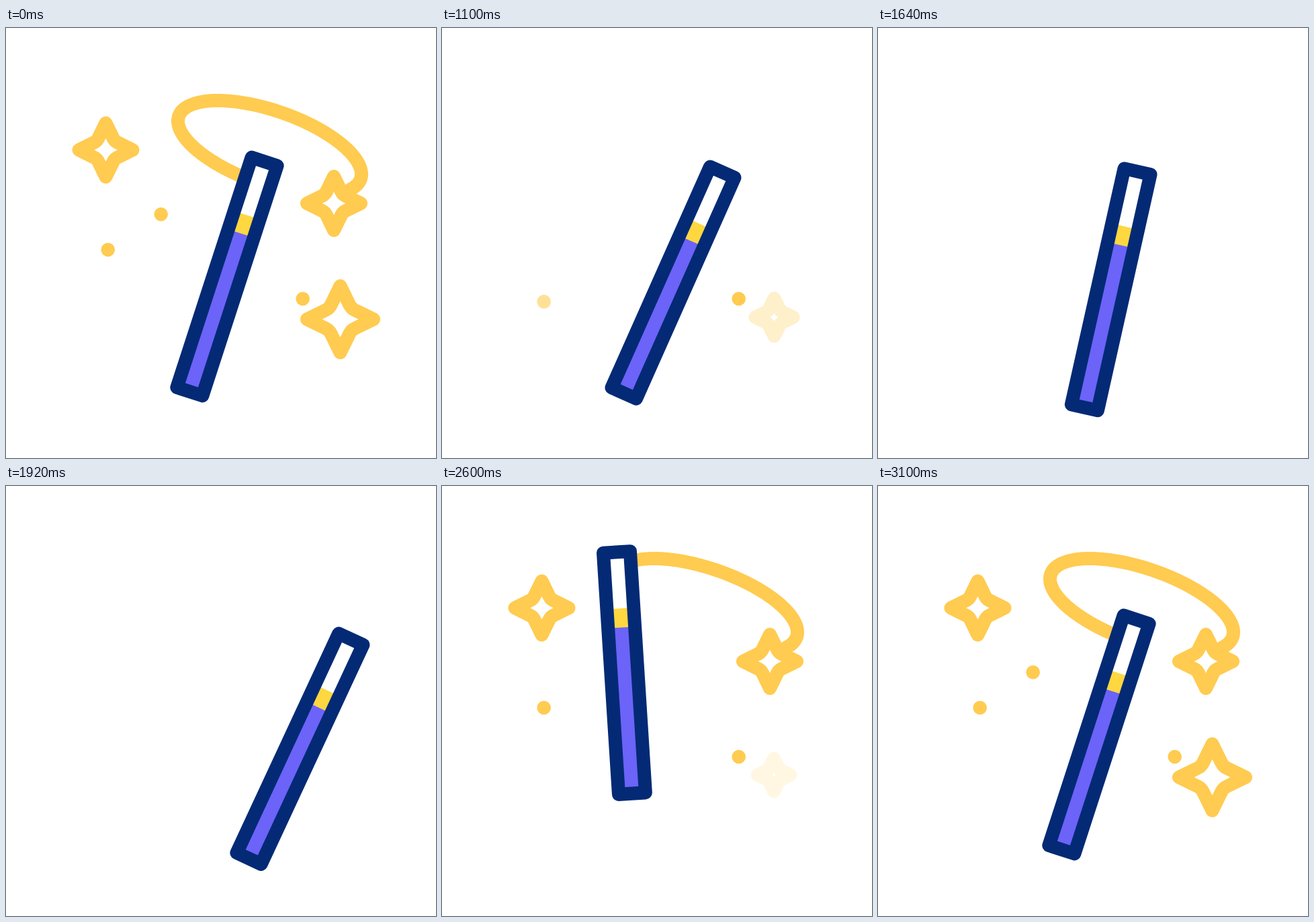
Write an HTML page that moves like this. It is 640 px wide and 640 px high and loops after 3.6 s.

```html
<!DOCTYPE html>
<html lang="en">
<head>
<meta charset="utf-8">
<title>Magic wand</title>
<style>
  html, body { margin: 0; width: 100%; height: 100%; overflow: hidden; background: #fff; }
  svg { display: block; width: 100vw; height: 100vh; }
</style>
</head>
<body>
<svg viewBox="0 0 640 640">
  <g id="sparks" fill="none" stroke="#ffcb50" stroke-width="20" stroke-linecap="round" stroke-linejoin="round">
    <path id="trail"/>
  </g>
  <g id="wand">
    <rect x="-20" y="-180" width="40" height="360" fill="#fff"/>
    <rect x="-11" y="-96" width="22" height="30" fill="#ffd740"/>
    <rect x="-11" y="-67.5" width="22" height="240" fill="#6c63f9"/>
    <rect x="-20" y="-180" width="40" height="360" fill="none" stroke="#042a75" stroke-width="20" stroke-linejoin="round"/>
  </g>
</svg>
<script>
const LOOP = 3600, RAD = Math.PI / 180;
const TRAIL_START = 29, TRAIL_END = -256;

// anchor, offset of the centre from it, radius, peak scale, end of exit, start of entrance
const stars = [
  { ax: 147, ay: 180, dx: 1.5, dy: 1.5, r: 40, peak: 1.38, out: 890, in: 2220 },
  { ax: 508, ay: 252, dx: -20, dy: 9, r: 40, peak: 1.3, out: 620, in: 1889 },
  { ax: 490.5, ay: 426.5, dx: 7, dy: 7, r: 49.5, peak: 1.25, out: 1158, in: 2560 }
];
const dots = [
  { x: 230.7, y: 277.3, out: 377, in: 2791 },
  { x: 151.7, y: 330, out: 769, in: 2451 },
  { x: 441.7, y: 403, out: 1150, in: 2111 }
];
// time, tip x, tip y, tilt
const wandKeys = [
  [0, 384.6, 198.8, 18], [700, 384.6, 198.8, 18], [1100, 417.2, 214.6, 24],
  [1300, 334.2, 200.2, 9], [1640, 385.8, 213.5, 12.6], [1820, 461.2, 226, 20],
  [1930, 514, 228, 25], [2060, 512, 180, 23], [2220, 430.6, 126.9, 17.7],
  [2360, 345, 107, 8], [2600, 260, 98.4, -3.65], [2900, 267.5, 171, 15],
  [3100, 384.6, 198.8, 18], [LOOP, 384.6, 198.8, 18]
];
// time, angle reached on the ellipse
const trailKeys = [
  [1930, TRAIL_START], [2060, -25], [2220, -74], [2360, -110],
  [2600, -163], [2900, -205], [3100, TRAIL_END], [LOOP, TRAIL_END]
];

const clamp = v => Math.min(1, Math.max(0, v));
const mix = (a, b, k) => a + (b - a) * k;
const smooth = v => { v = clamp(v); return v * v * (3 - 2 * v); };
const cubic = v => { v = clamp(v); return v < .5 ? 4 * v ** 3 : 1 - 4 * (1 - v) ** 3; };

// Smooth curve through keys that rests at turning points
function sample(keys, t, c) {
  const slope = i => (keys[i + 1][c] - keys[i][c]) / (keys[i + 1][0] - keys[i][0]);
  const tangent = i => {
    if (i === 0 || i === keys.length - 1) return 0;
    const a = slope(i - 1), b = slope(i);
    return a * b <= 0 ? 0 : 2 * a * b / (a + b);
  };
  if (t <= keys[0][0]) return keys[0][c];
  let i = 0;
  while (i < keys.length - 2 && t >= keys[i + 1][0]) i++;
  const span = keys[i + 1][0] - keys[i][0], u = (t - keys[i][0]) / span;
  const v = 1 - u;
  return mix(keys[i][c], keys[i + 1][c], smooth(u))
    + span * u * v * (tangent(i) * v - tangent(i + 1) * u);
}

function add(tag, attrs = {}) {
  const el = document.createElementNS("http://www.w3.org/2000/svg", tag);
  for (const k in attrs) el.setAttribute(k, attrs[k]);
  return document.getElementById("sparks").appendChild(el);
}
for (const s of stars) s.el = add("path");
for (const d of dots) d.el = add("circle", { cx: d.x, r: 10.3, fill: "#ffcb50", stroke: "none" });
const trail = document.getElementById("trail");
const wand = document.getElementById("wand");

function starPath(cx, cy, r) {
  let d = "";
  for (let q = 0; q < 4; q++) {
    const c = Math.round(Math.cos(q * Math.PI / 2)), s = Math.round(Math.sin(q * Math.PI / 2));
    const p = (x, y) => `${cx + r * (x * c - y * s)} ${cy + r * (x * s + y * c)}`;
    d += `${q ? "L" : "M"}${p(0, -1)}L${p(.28, -.43)}Q${p(.33, -.33)} ${p(.43, -.28)}`;
  }
  return d + "Z";
}

function drawStar(s, t) {
  const age = t < s.out ? s.out - t : t - s.in;
  const scale = age < 200 ? mix(.4, s.peak, smooth(age / 200)) : mix(s.peak, 1, smooth((age - 200) / 180));
  s.el.setAttribute("d", starPath(s.ax + s.dx * scale, s.ay + s.dy * scale, s.r * scale));
  s.el.setAttribute("opacity", smooth(age / 160));
}

function drawDot(d, t) {
  const fall = clamp((t - d.out) / 480), back = t >= d.in;
  d.el.setAttribute("cy", d.y + (back ? 0 : 100 * smooth(fall)));
  d.el.setAttribute("opacity", back ? smooth((t - d.in) / 160) : clamp((1 - fall) / .52));
}

function drawTrail(t) {
  const entering = t > 1500;
  const from = entering ? TRAIL_START : mix(TRAIL_START, TRAIL_END, cubic((t - 215) / 835));
  const to = entering ? sample(trailKeys, t, 1) : TRAIL_END;
  let d = "";
  if (from - to > .1) {
    const n = Math.ceil((from - to) / 3);
    for (let i = 0; i <= n; i++) {
      const a = mix(from, to, i / n);
      const x = 392.5 + 136.5 * Math.cos(a * RAD), y = 178 + 70 * Math.sin((a + 34.4) * RAD);
      d += `${i ? "L" : "M"}${x.toFixed(2)} ${y.toFixed(2)}`;
    }
  }
  trail.setAttribute("d", d);
}

function draw(t) {
  stars.forEach(s => drawStar(s, t));
  dots.forEach(d => drawDot(d, t));
  drawTrail(t);
  const [x, y, tilt] = [1, 2, 3].map(c => sample(wandKeys, t, c));
  wand.setAttribute("transform", `translate(${x} ${y}) rotate(${tilt}) translate(0 180)`);
}

const start = performance.now();
function tick() {
  draw((performance.now() - start) % LOOP);
  requestAnimationFrame(tick);
}
tick();
</script>
</body>
</html>
```
